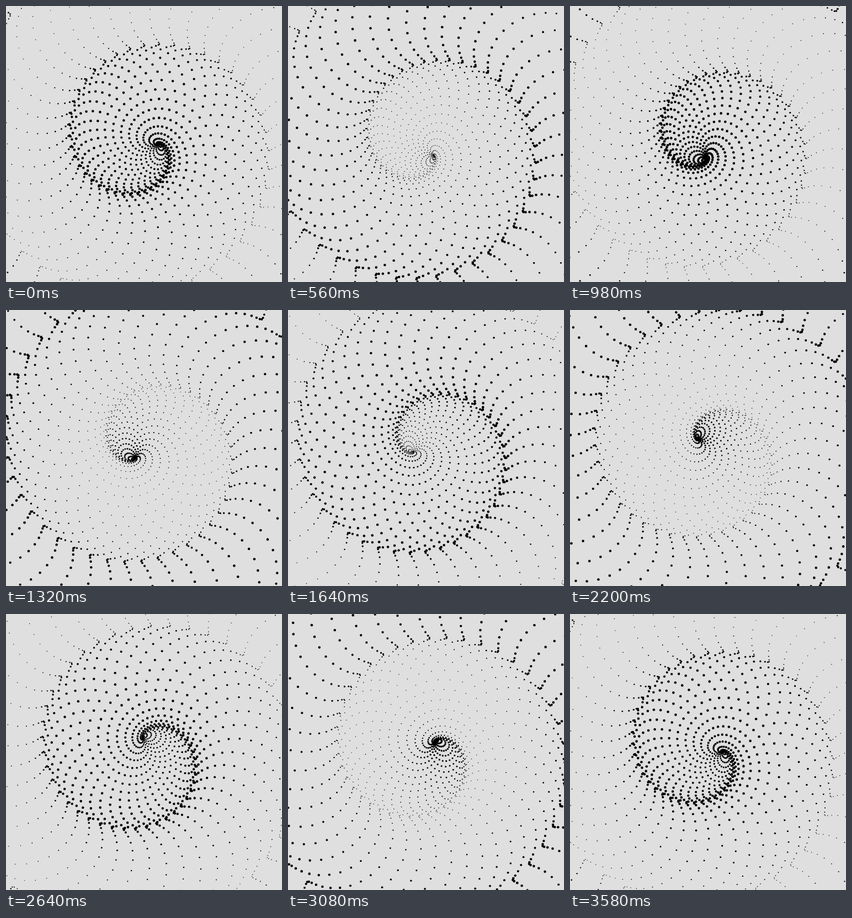
Animation, 500 px wide and 500 px high, one loop 3600 ms. Source, as an HTML page with a canvas:

```html
<!DOCTYPE html>
<html>
<head>
<meta charset="utf-8">
<style>
  html, body { margin: 0; width: 100%; height: 100%; overflow: hidden; background: #dfdfdf; }
  canvas { display: block; }
</style>
</head>
<body>
<canvas width="500" height="500"></canvas>
<script>
const ctx = document.querySelector('canvas').getContext('2d');
const TAU = 2 * Math.PI;
const DEG = TAU / 360;
const LOOP = 3600;
const DOTS = 1520;
const CENTER = 250.5;
const SWING = 25;

// A spiral with one radian per dot; every dot circles its own place,
// delayed by its index, while its size pulses four times per loop.
function draw(now) {
  const turn = (now % LOOP) / LOOP * TAU;
  ctx.fillStyle = '#dfdfdf';
  ctx.fillRect(0, 0, 500, 500);
  ctx.fillStyle = '#000';
  for (let i = 0; i < DOTS; i++) {
    const dist = i / 4;
    const phase = turn + i / 2 * DEG;
    const x = CENTER + dist * Math.cos(i) + SWING * Math.cos(phase);
    const y = CENTER + dist * Math.sin(i) + SWING * Math.sin(phase);
    const radius = 1.5 + 0.8 * Math.sin(4 * turn + i / 4 * DEG);
    ctx.beginPath();
    ctx.arc(x, y, radius, 0, TAU);
    ctx.fill();
  }
  requestAnimationFrame(draw);
}
requestAnimationFrame(draw);
</script>
</body>
</html>
```
